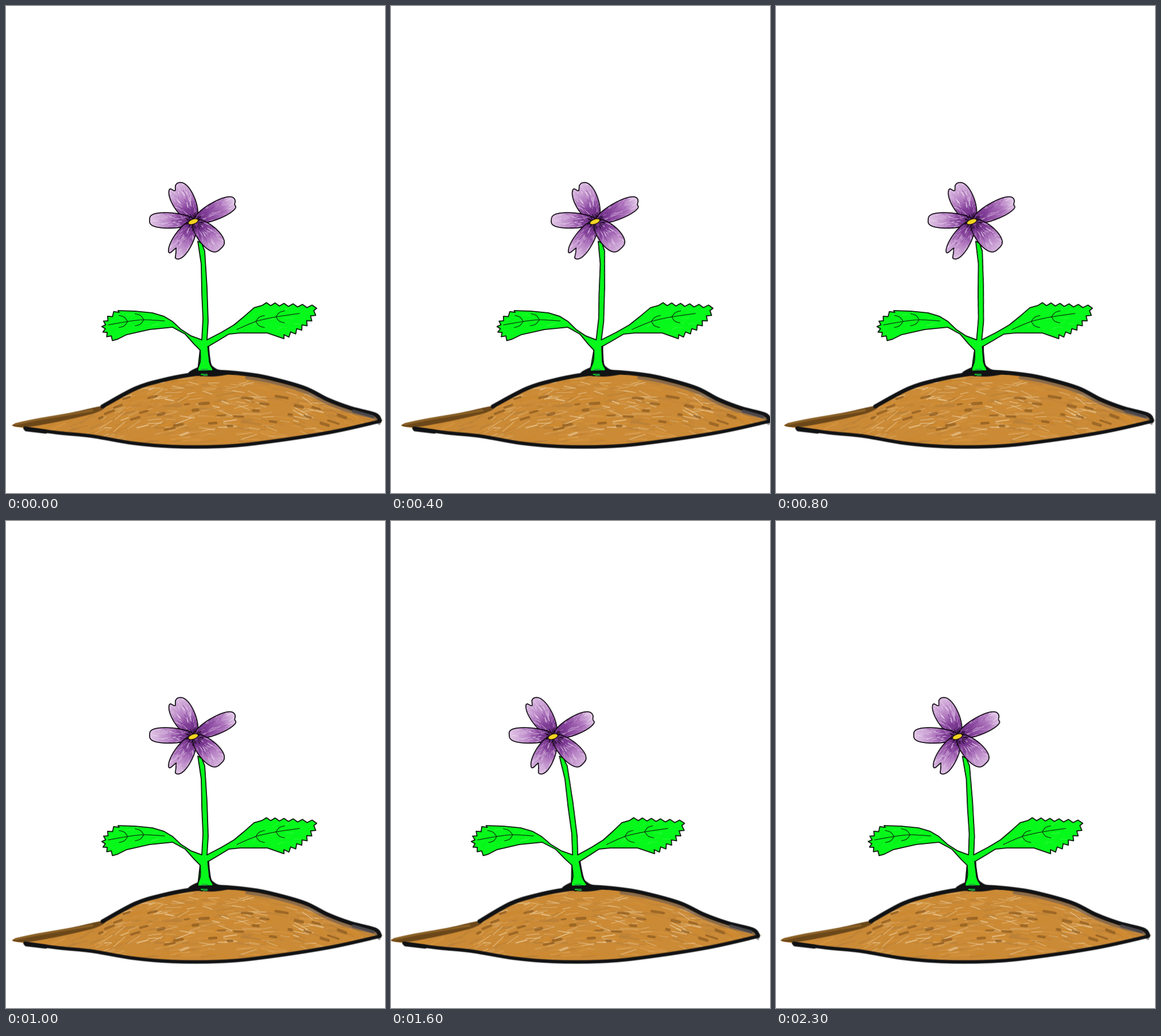
Recreate the animation shown at these times as an HTML page with a canvas. Size 660 by 849 pixels, loop 2.4 s.

```html
<!DOCTYPE html>
<html>
<head>
<meta charset="utf-8">
<style>
html, body { margin: 0; width: 100%; height: 100%; overflow: hidden; background: #fff; }
canvas { display: block; }
</style>
</head>
<body>
<canvas id="stage" width="660" height="849"></canvas>
<script>
const W = 660, H = 849, SCALE = 2, STEPS = 24;
const HEART = { x: 328, y: 375 };
const INK = '#111214';
const { sin, cos, abs, sign, PI, exp, hypot, atan2 } = Math;

const stage = document.getElementById('stage').getContext('2d');
const art = document.createElement('canvas');
art.width = W * SCALE;
art.height = H * SCALE;
const g = art.getContext('2d');
g.scale(SCALE, SCALE);
g.lineJoin = g.lineCap = 'round';

let seed = 7;
function rnd(a = 0, b = 1) {
  seed = (seed * 16807) % 2147483647;
  return a + (b - a) * seed / 2147483647;
}
const pick = list => list[Math.floor(rnd(0, list.length))];
const points = text => text.trim().split(/\s+/).map(p => p.split(',').map(Number));
const polygon = pts => new Path2D('M' + pts.join('L') + 'Z');

// Smooth curve through a few points
function curve(pts, closed) {
  const n = pts.length, path = new Path2D();
  const at = i => closed ? pts[(i + n) % n] : pts[Math.max(0, Math.min(n - 1, i))];
  path.moveTo(...pts[0]);
  for (let i = 0; i < (closed ? n : n - 1); i++) {
    const [a, b, c, d] = [at(i - 1), at(i), at(i + 1), at(i + 2)];
    path.bezierCurveTo(b[0] + (c[0] - a[0]) / 6, b[1] + (c[1] - a[1]) / 6,
      c[0] - (d[0] - b[0]) / 6, c[1] - (d[1] - b[1]) / 6, c[0], c[1]);
  }
  return path;
}

function stroke(path, color, width) {
  g.strokeStyle = color;
  g.lineWidth = width;
  g.stroke(path);
}

function fill(path, color) {
  g.fillStyle = color;
  g.fill(path);
}

function dash(x, y, angle, length, color, width) {
  const dx = cos(angle) * length / 2, dy = sin(angle) * length / 2;
  stroke(new Path2D(`M${x - dx},${y - dy}L${x + dx},${y + dy}`), color, width);
}

// Draw with a soft edge or inside a clip
function layer(blur, clip, draw) {
  g.save();
  if (clip) g.clip(clip);
  if (blur) g.filter = `blur(${blur}px)`;
  draw();
  g.restore();
}

function drawMound() {
  const ridge = points('168,698 225,667 270,653 320,643 370,638 420,642 460,649 520,666 560,686 600,701 642,712 651,722');
  const base = points('651,724 560,744 440,762 370,768 290,768 220,762 150,750 90,744 33,736');
  const body = curve([[14, 729], [100, 714], ...ridge, ...base], true);
  fill(body, '#cb8a36');

  // Strokes follow the slope of the hill
  const slope = x => (x - 390) / 550;
  layer(.7, body, () => {
    for (let i = 0; i < 520; i++) {
      const x = rnd(60, 640);
      g.globalAlpha = rnd(.2, .6);
      dash(x, rnd(648, 766), slope(x) + rnd(-.25, .25), rnd(10, 34),
        pick(['#d99a45', '#b98038', '#d58b2a', '#dcae6c', '#cf882a', '#b17d3a']), rnd(1.5, 4));
    }
    for (let i = 0; i < 110; i++) {
      const x = rnd(170, 570);
      g.globalAlpha = rnd(.25, .65);
      dash(x, rnd(656, 755), slope(x) + rnd(-.4, .4), rnd(8, 28), '#f0d9b0', rnd(1, 2.2));
    }
    for (let i = 0; i < 30; i++) {
      const x = 150 + i * 15;
      g.globalAlpha = .75;
      dash(x, rnd(680, 738), slope(x), rnd(4, 22), '#8f5d22', rnd(3, 5.5));
    }
  });

  layer(.9, null, () => {
    fill(curve(points('14,729 100,712 170,697 150,711 45,733'), true), '#6b4719');
    stroke(curve(points('17,729 60,720 150,705')), '#8a6026', 4);
    g.save();
    g.translate(-1, 6);
    stroke(curve(ridge.slice(5)), 'rgba(95,88,90,.6)', 5);
    g.restore();
    stroke(curve(ridge), INK, 7);
    stroke(curve(base), INK, 6);
    dash(52, 740, .12, 34, INK, 7);
    dash(622, 711, .28, 36, '#4b484c', 5);
  });
}

// Toothed edge along a quadratic arc
function serrate(a, c, b, teeth, depth) {
  const edge = [];
  for (let i = 0; i <= teeth * 2; i++) {
    const t = i / teeth / 2, s = 1 - t;
    const at = k => s * s * a[k] + 2 * s * t * c[k] + t * t * b[k];
    const tangent = k => s * (c[k] - a[k]) + t * (b[k] - c[k]);
    const out = i % 2 * depth / hypot(tangent(0), tangent(1));
    edge.push([at(0) + tangent(1) * out, at(1) - tangent(0) * out]);
  }
  return edge;
}

// Midrib with side veins in pairs
function drawVeins(rib, size, lean) {
  stroke(curve(rib), '#0a3a0d', 1.3);
  for (const [x, y] of rib.slice(1, -1)) {
    for (const side of [-1, 1]) {
      const end = [x + lean * size, y + side * size * .7];
      stroke(curve([[x, y], [x + lean * size * .4, y + side * size * .5], end]), '#0a3a0d', 1.2);
    }
  }
}

function drawPlant() {
  layer(1, null, () => {
    fill(curve(points('318,641 338,628 354,625 370,634 397,639 360,646'), true), INK);
  });

  const plant = polygon([
    ...points('338,600 328,590 312,572 290,560 250,564 210,573'),
    ...serrate([194, 581], [150, 561], [197, 534], 7, 6),
    ...points('195,531 225,532 255,535 275,541 290,550 305,564 322,575 341,582'),
    ...points('343,545 341,500 340,450 334,410 341,414 346,427 350,490 352,550 350,582'),
    ...points('375,569 397,556 415,541 432,526'),
    ...serrate([446, 522], [490, 523], [541, 527], 6, 5),
    ...serrate([536, 531], [521, 560], [484, 573], 6, 7),
    ...points('484,580 455,570 408,570 388,572 370,583 353,593 354,620 361,635 340,645 334,635')
  ]);
  fill(plant, '#07f81b');
  layer(0, plant, () => {
    for (let i = 0; i < 70; i++) {
      g.globalAlpha = rnd(.15, .4);
      dash(i % 2 ? rnd(180, 280) : rnd(405, 525), rnd(524, 577), rnd(-.8, .1), rnd(5, 15), pick(['#00e60c', '#63ff62']), 1.4);
    }
  });
  stroke(plant, '#0b1a0c', 1.8);

  layer(.7, null, () => {
    stroke(curve(points('352,594 356,624 364,635')), INK, 3);
    stroke(curve(points('338,600 338,620 332,636')), INK, 2);
    stroke(curve(points('322,640 350,638 396,640')), INK, 6);
    dash(347, 643, 0, 5, '#1c8a33', 4);
    dash(346, 634, 0, 9, '#19b535', 3);
  });

  drawVeins(points('178,556 212,550 240,547 276,549'), 15, -1);
  drawVeins(points('402,564 435,550 470,542 511,536'), 15, 1);
}

// A drop shape towards its tip, with an optional notch
function drawPetal({ tip, width, notch = 0, shift = 0, dark }) {
  const [dx, dy] = [tip[0] - HEART.x, tip[1] - HEART.y];
  const length = hypot(dx, dy), angle = atan2(dy, dx), outline = [];
  for (let i = 0; i < 90; i++) {
    const a = i / 90 * 2 * PI, u = (1 - cos(a)) / 2;
    const y = width * sign(sin(a)) * abs(sin(a)) ** .62 * u ** .18;
    const dent = u > .5 ? notch * exp(-(((y - shift) / 4) ** 2)) : 0;
    const x = u * length - dent;
    outline.push([HEART.x + x * cos(angle) - y * sin(angle), HEART.y + x * sin(angle) + y * cos(angle)]);
  }
  const path = polygon(outline);

  const tint = g.createRadialGradient(HEART.x, HEART.y, 4, HEART.x, HEART.y, 78);
  tint.addColorStop(0, '#57206f');
  tint.addColorStop(.3, '#84429a');
  tint.addColorStop(dark ? .7 : .5, '#b27bc0');
  tint.addColorStop(1, '#e4cae9');
  fill(path, tint);
  layer(0, path, () => {
    for (let i = 0; i < 260; i++) {
      const r = rnd(8, length), a = angle + rnd(-1, 1);
      const light = rnd(10, dark ? 88 : 56) < r;
      g.globalAlpha = rnd(.3, .8);
      dash(HEART.x + cos(a) * r, HEART.y + sin(a) * r, a + rnd(-.25, .25), rnd(4, 10),
        pick(light ? ['#dfbfe5', '#f4e6f6'] : ['#74308c', '#9550a8']), 1);
    }
  });
  stroke(path, '#120b14', 1.7);
}

function drawFlower() {
  drawPetal({ tip: [294, 311], width: 22, notch: 10, shift: -5 });
  drawPetal({ tip: [400, 340], width: 17, notch: 4, shift: 5, dark: true });
  drawPetal({ tip: [250, 373], width: 15 });
  drawPetal({ tip: [291, 438], width: 19, notch: 17, shift: 3 });
  drawPetal({ tip: [374, 423], width: 20 });

  for (let i = 0; i < 26; i++) {
    const a = i / 26 * 2 * PI + rnd(-.1, .1), r = rnd(9, 15);
    dash(327 + cos(a) * r, 376 + sin(a) * r * .85, a, rnd(4, 9), '#1d0a26', 1.2);
  }
  const eye = new Path2D();
  eye.ellipse(326, 376, 9, 4.3, -.35, 0, 2 * PI);
  fill(eye, '#f2d324');
  stroke(eye, '#1a1208', 1.3);
}

drawMound();
drawPlant();
drawFlower();

// Sideways shift of the flower: a slow swing with a slight unevenness
function sway(step) {
  const a = step / STEPS * 2 * PI;
  return -8.5 + 10.2 * cos(a) + 34.9 * sin(a) - .5 * cos(2 * a) + .9 * sin(2 * a) - 1.2 * cos(3 * a) + sin(3 * a);
}

function frame() {
  const step = Math.floor(performance.now() / 100) % STEPS;
  const lean = sway(step) / (H - HEART.y);
  stage.setTransform(1, 0, 0, 1, 0, 0);
  stage.fillStyle = '#fff';
  stage.fillRect(0, 0, W, H);
  stage.setTransform(1, 0, -lean, 1, lean * H, 0);
  stage.imageSmoothingQuality = 'high';
  stage.drawImage(art, 0, 0, W, H);
  requestAnimationFrame(frame);
}
frame();
</script>
</body>
</html>
```
